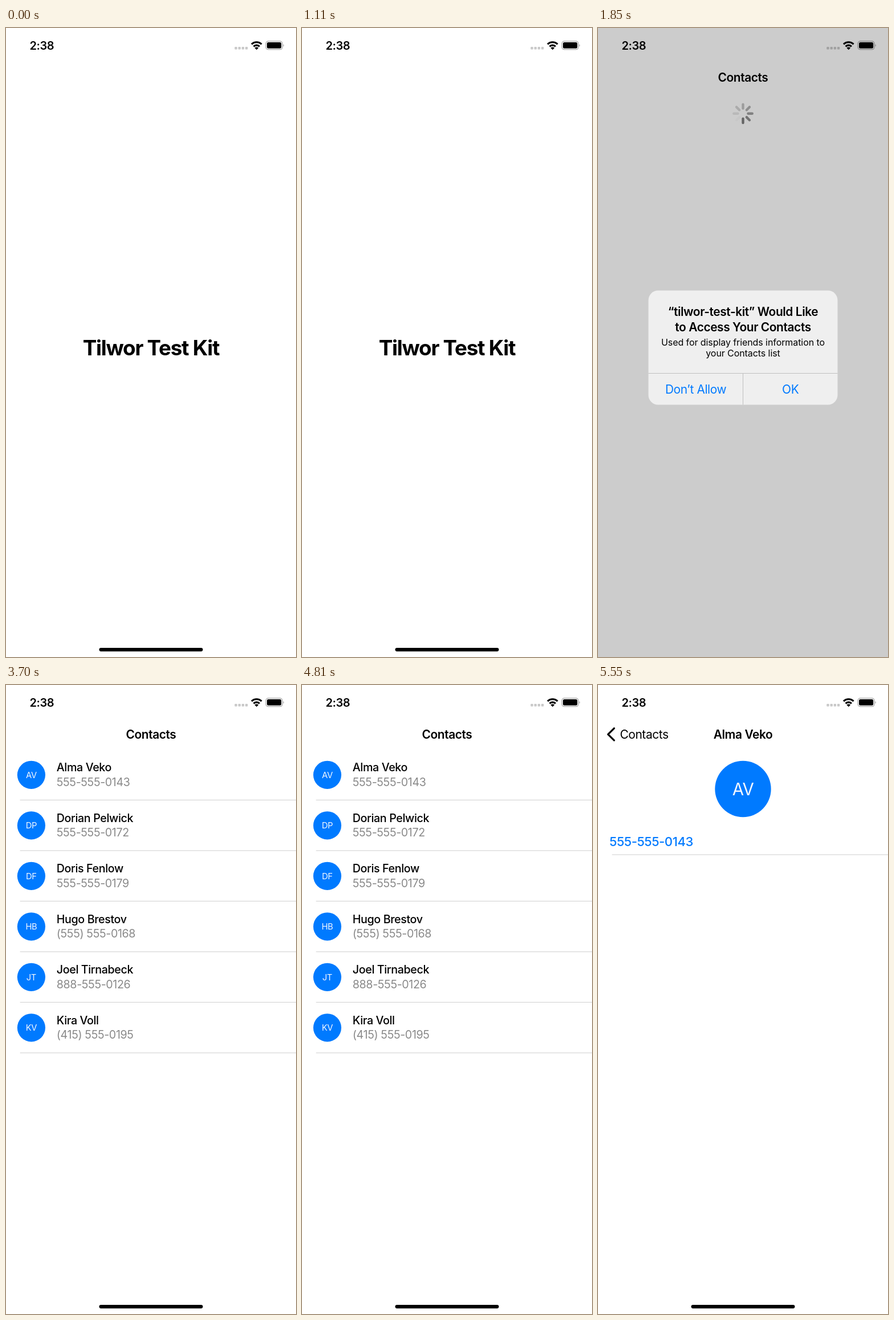
Recreate the animation shown at these times as an HTML page. Size 509x1101 px, loop 7400 ms.

```html
<!DOCTYPE html>
<html lang="en">
<head>
<meta charset="utf-8">
<title>Contacts app</title>
<style>
  html, body { margin: 0; width: 100%; height: 100%; overflow: hidden; background: #fff; }
  svg { display: block; width: 509px; height: 1101px; }
  text { font-family: Inter, sans-serif; letter-spacing: -.02em; white-space: pre; }
</style>
</head>
<body>
<svg id="stage" viewBox="0 0 509 1101"></svg>
<script>
const HOLD = 1850;
const MID = 254.5;
const BLUE = '#007aff';
const BODY = 20.9;

const people = [
  ['Alma Veko', '555-555-0143'],
  ['Dorian Pelwick', '555-555-0172'],
  ['Doris Fenlow', '555-555-0179'],
  ['Hugo Brestov', '(555) 555-0168'],
  ['Joel Tirnabeck', '888-555-0126'],
  ['Kira Voll', '(415) 555-0195'],
];

const text = (str, x, y, size, weight = 400, fill = '#000', extra = '') =>
  `<text x="${x}" y="${y}" font-size="${size}" font-weight="${weight}" fill="${fill}" ${extra}>${str}</text>`;
const centered = (str, x, y, size, weight, fill, extra = '') =>
  text(str, x, y, size, weight, fill, `text-anchor="middle" ${extra}`);
const rect = (x, y, w, h, fill, r = 0) =>
  `<rect x="${x}" y="${y}" width="${w}" height="${h}" rx="${r}" fill="${fill}"/>`;
const title = str => centered(str, MID, 93.5, BODY, 600);
const separator = y => rect(24.6, y, 485, 1.2, '#d6d6d6');
const homeBar = rect(163.5, 1085, 182, 6.2, '#000', 3.1);

function avatar(name, x, y, r) {
  const initials = name.split(' ').map(word => word[0]).join('');
  const size = r * .6;
  return `<circle cx="${x}" cy="${y}" r="${r}" fill="${BLUE}"/>` +
    centered(initials, x, y + size * .364, size, 400, '#f4f8ff');
}

function statusBar() {
  const dots = [0, 1, 2, 3].map(i => rect(401.3 + i * 6.2, 33, 4.4, 4.6, '#c9c9c9', 1)).join('');
  return text('2:38', 41.5, 37.5, 20, 600) + dots +
    `<path d="M431 28.3a12.7 12.7 0 0 1 17.6 0M434.6 32.3a7.4 7.4 0 0 1 10.4 0" fill="none" stroke="#000" stroke-width="3.1"/>
     <path d="M436.4 34.8q3.4-2.6 6.8 0L439.8 38.2z"/>
     <rect x="456.1" y="23.1" width="29" height="14.6" rx="4.2" fill="none" stroke="#a3a3a3" stroke-width="1.2"/>
     <path d="M486.6 28.2q2.6 2.2 0 4.6z" fill="#a3a3a3"/>` +
    rect(458, 25, 25.2, 10.8, '#000', 2.5);
}

// Spokes run anticlockwise from the darkest one, which points down.
function spinner(x, y) {
  let spokes = '';
  for (let i = 0; i < 8; i++)
    spokes += `<path d="M0 9V16.2" transform="rotate(${-45 * i})" opacity="${.5 - .068 * i}"/>`;
  return `<g transform="translate(${x} ${y})" stroke="#000" stroke-width="4.4" stroke-linecap="round">${spokes}</g>`;
}

const launch = () =>
  centered('Tilwor Test Kit', MID, 572.5, 36.9, 700, '#000', 'style="letter-spacing:-.035em"') + homeBar;

function permission() {
  const plain = 'style="letter-spacing:-.005em"';
  return title('Contacts') + spinner(MID, 149.8) +
    rect(0, 0, 509, 1101, 'rgba(0,0,0,.2)') +
    rect(88.5, 459.5, 332, 200, '#efefef', 17) +
    centered('“tilwor-test-kit” Would Like', MID, 503.8, BODY, 600) +
    centered('to Access Your Contacts', MID, 531, BODY, 600) +
    centered('Used for display friends information to', MID, 555.6, 16, 400, '#000', plain) +
    centered('your Contacts list', MID, 575, 16, 400, '#000', plain) +
    rect(88.5, 604, 332, 1, '#bfbfbf') + rect(254, 604, 1, 55.5, '#bfbfbf') +
    centered('Don’t Allow', 171.5, 640, BODY, 400, BLUE) +
    centered('OK', 337.7, 640, BODY, 400, BLUE);
}

const list = () => title('Contacts') + homeBar + people.map(([name, phone], i) => {
  const y = i * 88.5;
  return avatar(name, 44.4, 157.3 + y, 24.6) +
    text(name, 88.8, 151.2 + y, 19.7, 500) +
    text(phone, 88.8, 176.8 + y, 19.7, 400, '#8a8a8a') +
    separator(200.8 + y);
}).join('');

function detail([name, phone]) {
  return `<path d="M28.3 75.8L17.6 86.3L28.3 96.8" fill="none" stroke="#000" stroke-width="3.2" stroke-linecap="round" stroke-linejoin="round"/>` +
    text('Contacts', 38.5, 93.5, BODY) + title(name) +
    avatar(name, MID, 182, 49.2) +
    text(phone, 20, 282, 22.1, 500, BLUE) + separator(296.4) + homeBar;
}

const stage = document.getElementById('stage');
const screens = [launch(), permission(), list(), detail(people[0])];
stage.innerHTML = screens.map(screen => `<g>${statusBar()}${screen}</g>`).join('');

function draw() {
  const current = Math.floor(performance.now() / HOLD) % screens.length;
  [...stage.children].forEach((g, i) => g.style.display = i === current ? '' : 'none');
  requestAnimationFrame(draw);
}
draw();
</script>
</body>
</html>
```
